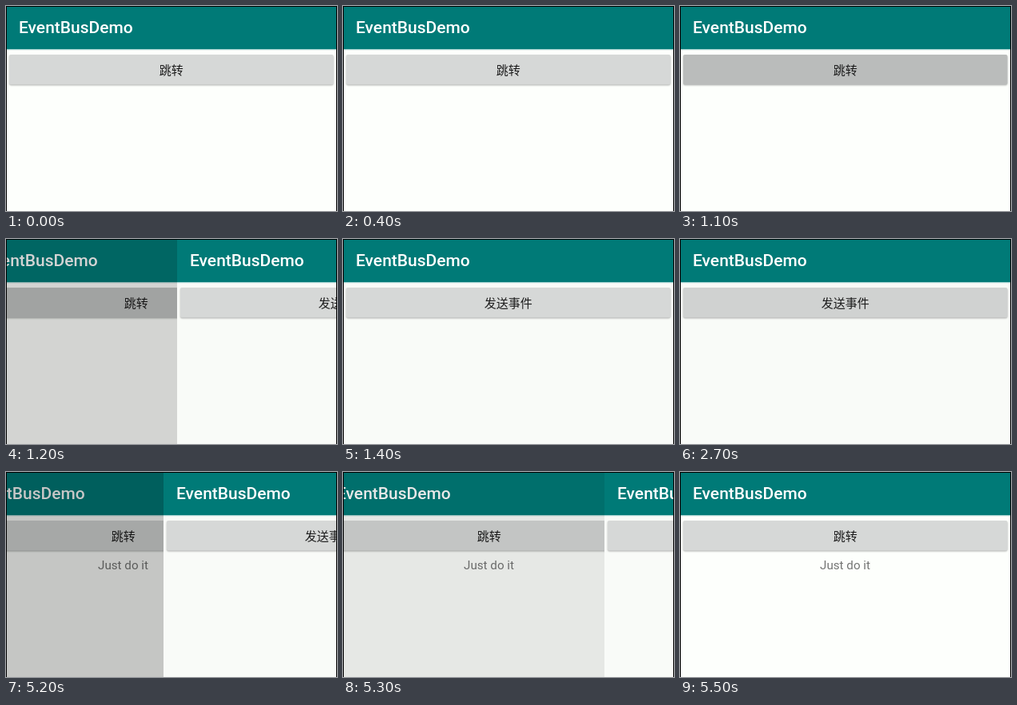
Recreate the animation shown at these times as an HTML page with a canvas. Size 414x257 px, loop 5700 ms.

```html
<!DOCTYPE html>
<html lang="zh-CN">
<head>
<meta charset="utf-8">
<title>EventBusDemo</title>
<style>
  html, body { margin: 0; width: 100%; height: 100%; overflow: hidden; background: #000; }
  canvas { display: block; width: 414px; height: 257px; }
</style>
</head>
<body>
<canvas id="stage" width="414" height="257"></canvas>
<script>
const W = 414, H = 257, LOOP = 5700, STEP = 100;
const ctx = document.getElementById('stage').getContext('2d');
const CJK = '15px "Noto Sans CJK SC", "Noto Sans CJK", sans-serif';

function label(text, x, y, font, color, align = 'center') {
  ctx.font = font;
  ctx.fillStyle = color;
  ctx.textAlign = align;
  ctx.fillText(text, x, y);
}

function button(text, shade) {
  ctx.save();
  ctx.shadowColor = 'rgba(0,0,0,0.3)';
  ctx.shadowBlur = 2;
  ctx.shadowOffsetY = 1;
  ctx.fillStyle = `rgb(${shade},${shade + 2},${shade + 1})`;
  ctx.beginPath();
  ctx.roundRect(4, 61, 405.5, 37.5, 2);
  ctx.fill();
  ctx.restore();
  label(text, 206.7, 86, CJK, '#1c1c1c');
}

function page(x, { bg, text, shade, note = '', dim = 0 }) {
  ctx.save();
  ctx.translate(Math.round(x), 0);
  ctx.fillStyle = bg;
  ctx.fillRect(0, 0, W, H);
  ctx.fillStyle = '#007a77';
  ctx.fillRect(0, 0, W, 54);
  ctx.fillStyle = '#a9d6d3';
  ctx.fillRect(0, 54, W, 1);
  ctx.fillStyle = '#eaf2f0';
  ctx.fillRect(0, 55, W, 1);
  label('EventBusDemo', 16, 33.5, '500 21px Roboto, sans-serif', '#fff', 'left');
  button(text, shade);
  if (note) label(note, 206.5, 122, '15.2px Roboto, sans-serif', '#747574');
  if (dim) {
    ctx.fillStyle = `rgba(0,0,0,${dim})`;
    ctx.fillRect(0, 0, W, H);
  }
  ctx.restore();
}

const clamp = v => Math.min(1, Math.max(0, v));
const easeOut = (t, start, length, power) =>
  1 - Math.pow(1 - clamp((t - start) / length), power);

function homeShade(t) {
  if (t < 1000 || t >= 1400) return 214;
  return t < 1100 ? 200 : t < 1200 ? 186 : 194;
}

function sendShade(t) {
  if (t < 2500 || t >= 5200) return 214;
  return t < 2600 ? 203 : t < 2700 ? 196 : 208;
}

function draw(t) {
  const closing = t >= 3000;
  // share of the stage covered by the second page
  const cover = closing ? 1 - easeOut(t, 5100, 400, 2.25) : easeOut(t, 1100, 300, 1.627);
  const drift = closing ? 0.277 : 0.22;
  const dim = closing ? 0.43 : 0.35;

  if (cover < 1) {
    page(-W * drift * cover, {
      bg: '#fdfffc', text: '跳转', shade: homeShade(t),
      note: closing ? 'Just do it' : '', dim: dim * cover
    });
  }
  if (cover > 0) {
    page(W * (1 - cover), { bg: '#f9fbf8', text: '发送事件', shade: sendShade(t) });
  }

  ctx.fillStyle = '#000';
  ctx.fillRect(0, 0, W, 1);
  ctx.fillRect(0, 0, 1, H);
  ctx.fillRect(W - 1, 0, 1, H);
}

const begin = performance.now();
function tick() {
  const t = (performance.now() - begin) % LOOP;
  draw(Math.floor(t / STEP) * STEP);
  requestAnimationFrame(tick);
}
tick();
</script>
</body>
</html>
```
